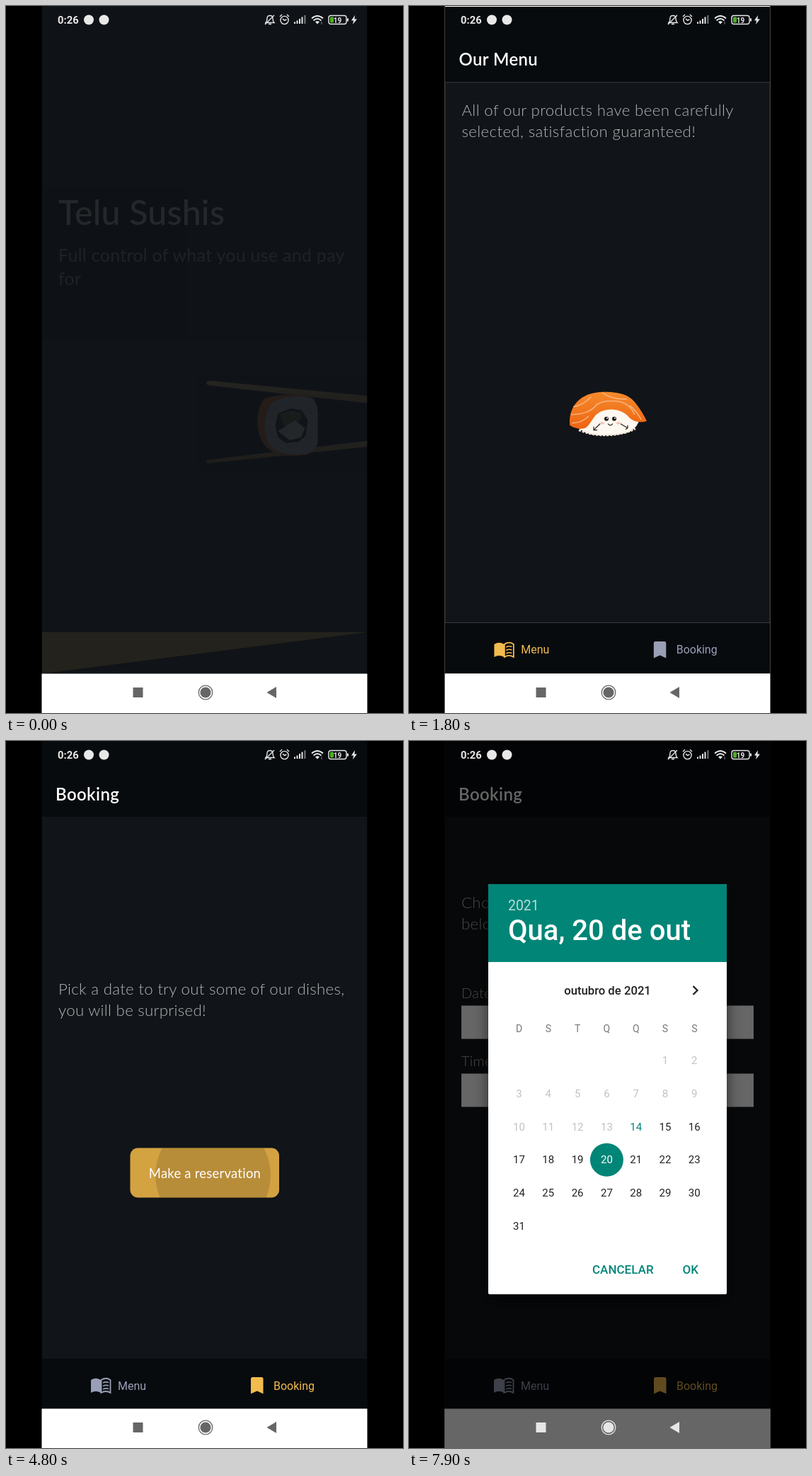
An HTML page that plays this animation: 561x998 px, repeating every 8000 ms.

```html
<!DOCTYPE html>
<html lang="en">
<head>
<meta charset="utf-8">
<title>Sushi app walkthrough</title>
<style>
html, body { margin: 0; width: 100%; height: 100%; overflow: hidden; background: #000; }
svg { display: block; width: 100vw; height: 100vh; }
text { white-space: pre; }
.app { font-family: Lato, "Open Sans", sans-serif; letter-spacing: .017em; fill: #fff; }
.sys { font-family: Roboto, Inter, sans-serif; }
.para { font-size: 22.3px; font-weight: 300; fill: #b4b5b7; }
.item { font-size: 22.3px; font-weight: 500; }
.head { font-size: 24px; font-weight: 600; }
.tab { font-size: 16px; }
.teal { fill: #008577; font-size: 17px; font-weight: 500; }
.day { font-size: 15px; text-anchor: middle; }
</style>
</head>
<body>
<svg viewBox="0 0 561 998" preserveAspectRatio="none">
<defs>
  <clipPath id="screen"><rect x="50.5" width="460" height="942.5"/></clipPath>
  <clipPath id="body"><rect x="50.5" y="107" width="460" height="765"/></clipPath>
  <clipPath id="btnClip"><rect x="175.5" y="574.5" width="210.5" height="70" rx="11"/></clipPath>
  <linearGradient id="stick" x2="0" y2="1"><stop stop-color="#efc47c"/><stop offset="1" stop-color="#b27f38"/></linearGradient>
  <linearGradient id="salmon" x2="0" y2="1"><stop stop-color="#f58a2a"/><stop offset="1" stop-color="#ee6414"/></linearGradient>
  <linearGradient id="oil" x2="1"><stop stop-color="#5e1d0c"/><stop offset=".5" stop-color="#c8501c"/><stop offset="1" stop-color="#5e1d0c"/></linearGradient>
  <filter id="shadow" x="-20%" y="-20%" width="140%" height="140%"><feDropShadow dx="0" dy="7" stdDeviation="10" flood-opacity=".6"/></filter>
  <path id="bookmark" d="M348.5 898h12.5q2.500 0 2.500 2.500v21l-8.750-4-8.750 4v-21q0-2.500 2.500-2.500z"/>
  <g id="book">
    <path d="M120 902q7-4.500 14 0v18q-7-4-14 0z"/>
    <path d="M134.500 902q6.500-4.500 13 0v18q-6.500-4-13 0z" fill="none" stroke="currentColor" stroke-width="1.800"/>
    <path d="M137 906q4-2 8-.5M137 910.500q4-2 8-.5M137 915q4-2 8-.5" fill="none" stroke="currentColor" stroke-width="1.600"/>
  </g>
</defs>
<rect width="561" height="998"/>

<g clip-path="url(#screen)">
  <g id="splash">
    <rect x="50.5" width="460" height="943" fill="#101418"/>
    <g id="intro">
      <rect x="50.5" width="460" height="471" fill="#080b0e"/>
      <path d="M50.500 884H510.500L50.500 942.500z" fill="#f0b54a"/>
      <g class="app">
        <text x="74" y="309" font-size="48.200" font-weight="500">Telu Sushis</text>
        <g font-size="25" fill="#b3b4b6">
          <text x="74" y="360.500">Full control of what you use and pay</text>
          <text x="74" y="394">for</text>
        </g>
      </g>
      <g id="roll">
        <rect x="236" y="520" width="400" height="136" fill="#0b0e18" opacity=".5"/>
        <path d="M247 641L620 596.500V607L250 645.500q-4 0-3-4.500z" fill="url(#stick)"/>
        <path d="M247 530.500q2-2 6-1.500L620 564.500V577L250 535.500q-4-1-3-5z" fill="url(#stick)"/>
        <path d="M330 554q30-10 64-2 10 4 10 24v38q0 18-22 20-28 4-44-6-18-12-19-38 0-28 11-36z" fill="#e9772a"/>
        <path d="M347 556q26-9 48-2 9 6 9 26v32q0 18-22 21-28 1-40-8-13-10-13-34 2-28 18-35z" fill="#d6d6e2"/>
        <path d="M348 575l18-7 16 3 8 14-3 22-10 8-18 2-11-8-4-17z" fill="#24242c"/>
        <path d="M350 577l16-6 16 4-4 11-20 8z" fill="#71803e"/>
        <path d="M348 600l24-15 14 11-6 13-16 4z" fill="#f2e8e2"/>
        <path d="M337 572l4 12M338 600l6 14M392 566l4 12M394 600l-4 14M362 622l12 2" stroke="#aeb0c4" stroke-width="3" stroke-dasharray="3 4"/>
      </g>
    </g>
  </g>

  <rect id="flash" x="50.5" width="460" height="943" fill="#fff"/>

  <g id="home">
    <rect x="50.5" width="460" height="943" fill="#111418"/>
    <g id="menu">
      <g class="app para">
        <text x="74" y="154">All of our products have been carefully</text>
        <text x="74" y="184.500">selected, satisfaction guaranteed!</text>
      </g>
      <g id="loader">
        <path d="M238 594q6-16 26-23 22-6 42 2 14 6 19 14-6 13-18 16-24 6-50 2-14-4-19-11z" fill="#fdf8f0"/>
        <path d="M240 599q20 8 42 7t38-9" fill="none" stroke="#f3e9da" stroke-width="3" stroke-dasharray="3 2"/>
        <path d="M227 592c-2-31 20-47 48-47 29 0 39 7 47 18 6 8 10 15 14 23-7 3-17 2-24-4-12-16-39-16-50-2-8 11-10 17-18 17-7 0-13-2-17-5z" fill="url(#salmon)"/>
        <path d="M229 577q26 0 36-14 12-8 34-4 14 4 20 18M232 566q14-2 25-14M273 546q14 10 35 9M230 589q14 0 24-10M312 564q10 8 16 20" fill="none" stroke="#f9b27b" stroke-width="1.600"/>
        <g fill="#1e1718">
          <circle cx="279" cy="583" r="3"/><circle cx="290" cy="583" r="3"/>
        </g>
        <circle cx="280" cy="582" r="1" fill="#fff"/><circle cx="291" cy="582" r="1" fill="#fff"/>
        <path d="M281 590q3.500 4.500 7 0M270 590l-9 9m0-5v5h5M299 590l10 6m0-4v4l-3 2" fill="none" stroke="#2a2021" stroke-width="1.200"/>
        <ellipse cx="273" cy="589" rx="3" ry="1.800" fill="#f6c2b8"/><ellipse cx="296" cy="589" rx="3" ry="1.800" fill="#f6c2b8"/>
      </g>
      <g id="list">
        <g id="rows" class="app item"></g>
        <g id="photos">
          <g>
            <g font-family="'Noto Serif', serif" font-weight="700" font-size="17" fill="#e3605f">
              <text x="78" y="239">Photo Not</text><text x="78" y="261">Available...</text>
            </g>
            <path d="M78 299h108l-6 19H82z" fill="#c5dfe6"/>
            <path d="M98 272h34l4 26H94z" fill="#d9d8d6"/><path d="M102 276h27l2 16H100z" fill="#bcbcba"/>
            <path d="M118 279h20v20h-20zM146 284h14v16h-14zM163 280h10v20h-10z" fill="#cfd6d4"/>
            <path d="M81 290l6-4 3 16-6 3zM180 298l6 2-3 14-6-2z" fill="#edcf7c"/>
            <circle cx="152" cy="296" r="5" fill="#d9a6a0"/>
          </g>
          <g>
            <path d="M126 362h15v22q7 8 7 18v55q0 6-5 6h-19q-5 0-5-6v-55q0-10 7-18z" fill="url(#oil)"/>
            <path d="M125 351h17v28h-17zM119 405h29v49h-29z" fill="#201d20"/>
            <circle cx="133.500" cy="420" r="9" fill="#c8342c"/>
            <g class="sys" font-size="6.500" font-weight="700" fill="#eee" text-anchor="middle">
              <text x="133.500" y="440">Japanese</text><text x="133.500" y="447">Sesame Oil</text>
            </g>
          </g>
          <g>
            <path d="M126 498h14q0 14 8 22 6 6 6 14v57q0 6-6 6h-29q-6 0-6-6v-57q0-8 6-14 7-8 7-22z" fill="#23151a"/>
            <path d="M125 484h17v14h-17z" fill="#d8212d"/>
            <path d="M114 537q20-8 40 0v53h-40z" fill="#3f9fae"/>
            <path d="M116 570q18-14 36 0v21h-36z" fill="#e9cf9a"/>
            <circle cx="133.500" cy="548" r="7" fill="#1d2a49"/>
            <ellipse cx="128" cy="584" rx="10" ry="5" fill="#d56a24"/><ellipse cx="143" cy="581" rx="8" ry="5" fill="#587e38"/>
            <text class="sys" x="134" y="567" font-size="6" font-weight="700" text-anchor="middle" fill="#18242c">Sushi &amp; Sashimi</text>
          </g>
          <g>
            <rect x="106" y="636" width="56" height="95" rx="10" fill="#dc8270"/>
            <rect x="109" y="620" width="50" height="19" rx="4" fill="#eceaea"/><path d="M109 628h50" stroke="#d4d2d4" stroke-width="3"/>
            <rect x="107" y="659" width="54" height="51" fill="#e5574d"/><path d="M107 659h54v14l-54 10z" fill="#f0d3a0"/>
            <circle cx="119" cy="667" r="5" fill="#34302a"/>
            <text class="sys" x="134" y="692" font-size="15" font-weight="800" font-style="italic" text-anchor="middle" fill="#f5d743" stroke="#4d3f27" stroke-width=".5" transform="rotate(-5 134 688)">GINGER</text>
          </g>
          <g>
            <path d="M97 752l72 2v109l-72 1z" fill="#252326"/>
            <circle cx="133" cy="773" r="20" fill="#cc3a31"/>
            <rect x="113" y="794" width="39" height="29" fill="#ded2b4"/>
            <g class="sys" font-size="9.500" font-weight="700" fill="#fff" text-anchor="middle">
              <text x="132" y="837">Premium</text><text x="132" y="849">Sushi Rice</text>
            </g>
            <path d="M111 858h44" stroke="#8b8a8b" stroke-dasharray="4 1"/>
          </g>
        </g>
      </g>
    </g>

    <g id="booking" class="app">
      <text class="para" x="74" y="358">Pick a date to try out some of our dishes,</text>
      <text class="para" x="74" y="388">you will be surprised!</text>
      <g clip-path="url(#btnClip)">
        <rect x="175" y="574" width="212" height="72" fill="#f0b84a"/>
        <g id="press" fill="#000">
          <rect x="175" y="574" width="212" height="72" opacity=".12"/>
          <circle id="ripple" cx="292.500" cy="613" opacity=".13"/>
        </g>
      </g>
      <text x="281" y="617" font-size="18.400" text-anchor="middle">Make a reservation</text>
    </g>

    <g clip-path="url(#body)">
      <g id="form" class="app">
        <rect x="50.5" y="107" width="460" height="765" fill="#111418"/>
        <g class="para">
          <text x="74" y="236">Choose the date and time</text>
          <text x="74" y="266">below to continue</text>
          <text x="74" y="363" font-size="20">Date</text>
          <text x="74" y="459" font-size="20">Time</text>
        </g>
        <path d="M74 373.500h413v47H74zM74 469.500h413v47H74z"/>
      </g>
    </g>

    <path d="M50.500 0h460v107h-460zM50.500 872h460v71h-460z" fill="#080b0e"/>
    <path id="seams" d="M50.500 107h460M50.500 871.500h460" stroke="#3c3f42"/>
    <text id="title" class="app head" x="70" y="83.500"></text>
    <g id="tabMenu"><use href="#book"/><text class="sys tab" x="158" y="915.500">Menu</text></g>
    <g id="tabBook"><use href="#bookmark"/><text class="sys tab" x="378" y="915.500">Booking</text></g>
  </g>
</g>

<rect x="50.5" y="942.5" width="460" height="56" fill="#fff"/>
<rect id="dim" x="50.5" width="460" height="998"/>
<g id="keys">
  <rect x="179.500" y="962" width="14" height="14"/>
  <circle cx="282" cy="969" r="7.600"/><circle cx="282" cy="969" r="9.800" fill="none" stroke="currentColor" stroke-width="1.300"/>
  <path d="M368.500 969l13.500-8v16z"/>
</g>

<g id="status" fill="#e8e8e8" stroke="none" class="sys">
  <text x="73" y="25" font-size="14.800" font-weight="700">0:26</text>
  <circle cx="117" cy="19.500" r="7"/><circle cx="138.500" cy="19.500" r="7"/>
  <g fill="none" stroke="#e8e8e8" stroke-width="1.400">
    <path d="M367 23.500q2-2 2-6 0-4 4-4t4 4 2 6zM371 25.500h4M379 13L366 26"/>
    <circle cx="393.500" cy="20" r="5.600"/><path d="M391 18l2.500 2.500 3-1.500M387 15l3-3M400 15l-3-3"/>
    <path d="M432 17.500q8-7 16 0M434.500 20.500q5.500-5 11 0" stroke-width="1.800"/>
    <rect x="456" y="13.500" width="25" height="12" rx="3"/>
  </g>
  <path d="M407 25v-2.500h2V25zM410.500 25v-4.500h2V25zM414 25v-7h2v7zM417.500 25v-9.500h2V25zM437 22.500q3-2.500 6 0l-3 3zM482 17.500h2v4h-2zM493 13l-5 7.500h3.200L490 26l6-7.500h-3.500z"/>
  <path d="M421.500 25V13h1.800v12zM445.500 22h1v4h-1z" opacity=".55"/>
  <rect x="458" y="15.500" width="5" height="8" rx="1" fill="#4caf22"/>
  <text x="468.500" y="23.500" font-size="10" font-weight="700" text-anchor="middle">19</text>
</g>

<g id="dialog" class="sys">
  <rect x="112" y="202" width="337" height="579" rx="2" fill="#fff" filter="url(#shadow)"/>
  <path d="M112 312V204q0-2 2-2h333q2 0 2 2v108z" fill="#008577"/>
  <text x="140" y="238.500" font-size="19.400" fill="#fff" opacity=".72">2021</text>
  <text id="picked" x="140" y="281" font-size="40" font-weight="500" fill="#fff"></text>
  <text x="280.500" y="358" font-size="16.700" font-weight="500" text-anchor="middle" fill="#202020">outubro de 2021</text>
  <path d="M401.500 346l6 6-6 6" fill="none" stroke="#222" stroke-width="2.300"/>
  <circle id="mark" r="23.500" fill="#008577"/>
  <g id="days" class="day"></g>
  <text class="teal" x="259" y="751.500">CANCELAR</text>
  <text class="teal" x="386.500" y="751.500">OK</text>
</g>
</svg>

<script>
const $ = id => document.getElementById(id);
const clamp = v => Math.max(0, Math.min(1, v));
const show = (id, v) => {
  $(id).style.display = v > 0 ? '' : 'none';
  $(id).setAttribute('opacity', +v);
};
const zoom = (id, s, cx, cy) =>
  $(id).setAttribute('transform', `translate(${cx} ${cy}) scale(${s}) translate(${-cx} ${-cy})`);
const tint = (id, color) => {
  $(id).setAttribute('fill', color);
  $(id).style.color = color;
};

const products = [
  'Dorvale Nori Bench  Soy|Sauce, 10 oz',
  'Dorvale Company Nori|Bench 100% Pure Japanese|Sesame Oil, 5 Fl. Oz.',
  'Hanetomi Sushi &amp; Sashimi|Soy Sauce, 10 oz (Pack of|6)',
  'Fen-Rio Ginger Sushi, 11.5|FL OZ',
  'Nori Bench Premium Sushi|Rice, 20 Oz'
];
$('rows').innerHTML = products.map((name, i) => {
  const y = 214 + i * 133.75;
  const lines = name.split('|').map((s, k) => `<text x="203" y="${y + 24 + k * 30.2}">${s}</text>`);
  return `<rect x="74" y="${y}" width="117" height="117"/>` + lines.join('');
}).join('');

// October 2021 starts on a Friday.
const cell = d => [155.5 + (d + 4) % 7 * 41.3, 450.5 + Math.floor((d + 4) / 7) * 46.9];
const dayColor = d => d < 14 ? '#c2c2c2' : d === 14 ? '#008577' : '#222';
$('days').innerHTML =
  [...'DSTQQSS'].map((c, i) => `<text x="${155.5 + i * 41.3}" y="411" fill="#777" font-size="14">${c}</text>`).join('') +
  Array.from({ length: 31 }, (_, i) => {
    const [x, y] = cell(i + 1);
    return `<text id="d${i + 1}" x="${x}" y="${y + 5.2}">${i + 1}</text>`;
  }).join('');
const weekdays = ['Dom', 'Seg', 'Ter', 'Qua', 'Qui', 'Sex', 'Sáb'];

function pick(day) {
  const [x, y] = cell(day);
  $('mark').setAttribute('cx', x);
  $('mark').setAttribute('cy', y);
  $('picked').textContent = `${weekdays[(day + 4) % 7]}, ${day} de out`;
  for (let d = 1; d <= 31; d++) $('d' + d).setAttribute('fill', d === day ? '#fff' : dayColor(d));
}

// A screen grows from 85% while it fades in.
function enter(id, t, start, cy) {
  const age = t - start;
  show(id, clamp(age / 100));
  zoom(id, age > 450 ? 1 : 1 - .15 * Math.exp(-Math.max(0, age) / 61), 280.5, cy);
}

function render(t) {
  const u = clamp((t + 130) / 1530);
  show('splash', t < 1650);
  show('intro', u);
  $('roll').setAttribute('transform', `translate(${36.5 * (1 - Math.min(t, 1400) / 800)} 0)`);

  enter('home', t, 1550, 471);
  show('flash', t >= 1650 && t < 2000);
  show('seams', t >= 1650 && t < 1900);

  const booking = t >= 3500;
  show('menu', !booking);
  show('loader', t < 2300);
  show('list', t >= 2300);
  show('photos', t < 2500 ? 0 : t < 2700 ? .6 : 1);
  $('title').textContent = booking ? 'Booking' : 'Our Menu';
  tint('tabMenu', booking ? '#9a9fb8' : '#f1bb4e');
  tint('tabBook', booking ? '#f1bb4e' : '#9a9fb8');

  show('booking', booking);
  show('press', t >= 4780 && t < 5300 ? 1 - clamp((t - 4950) / 300) : 0);
  $('ripple').setAttribute('r', Math.max(0, 81 + (t - 4800) * .35));
  enter('form', t, 4950, 490);

  const open = clamp((t - 5920) / 240);
  const ease = 1 - (1 - open) ** 3;
  show('dim', .6 * open);
  const grey = Math.round(102 + 128 * open);
  tint('keys', `rgb(${grey},${grey},${grey})`);
  show('dialog', ease);
  zoom('dialog', .9 + .1 * ease, 280.5, 491.5);
  pick(t < 6700 ? 15 : t < 7100 ? 22 : t < 7600 ? 21 : 20);
}

function tick() {
  render(performance.now() % 8000);
  requestAnimationFrame(tick);
}
tick();
</script>
</body>
</html>
```
